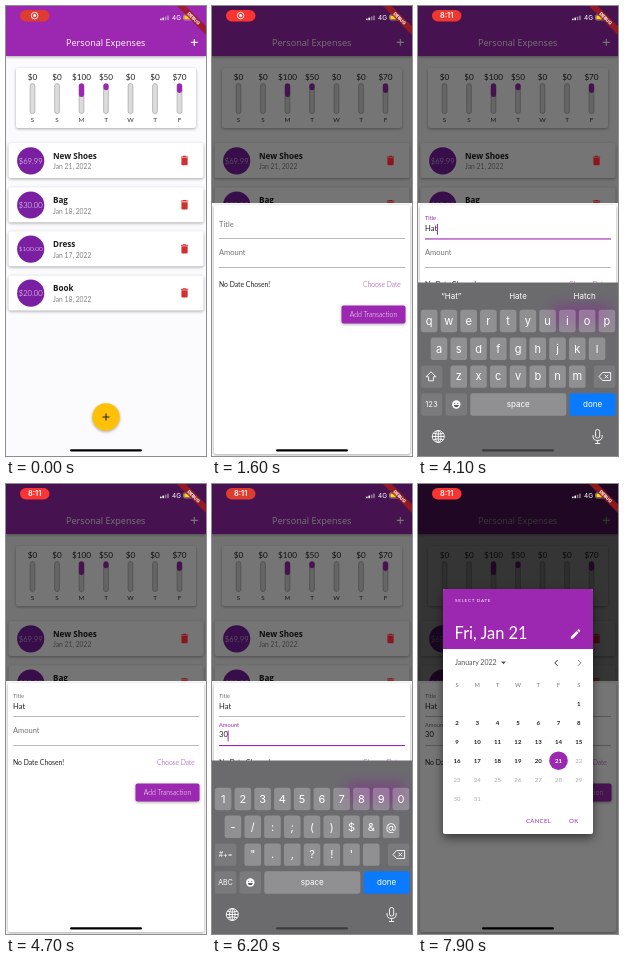
Animation, 200 px wide and 450 px high, one loop 8 s. Source, as an HTML page:

```html
<!DOCTYPE html>
<html lang="en">
<head>
<meta charset="utf-8">
<title>Expense tracker</title>
<style>
  html, body { margin: 0; width: 100%; height: 100%; overflow: hidden; background: #fbfafc; }
  svg { display: block; width: 100vw; height: 100vh; }
  text { font-family: Lato, "Open Sans", sans-serif; white-space: pre; }
  .open { font-family: "Open Sans", sans-serif; }
  .ui { font-family: Inter, Roboto, sans-serif; }
  .light { font-weight: 300; }
  .card { fill: #fff; filter: drop-shadow(0 1.8px 1.6px rgba(0, 0, 0, .33)); }
</style>
</head>
<body>
<svg id="stage" viewBox="0 0 200 450" preserveAspectRatio="none"></svg>
<script>
const LOOP = 8000;
const PURPLE = '#9c27b0', DEEP = '#7b1fa2', GREY = '#757575', INK = '#222';

// Times in ms at which things start to happen
const T = {
  sheet: 1200, clock: 1900, focusTitle: 1900, keysReady: 2400, shift: 2700,
  typeH: 2900, typeA: 3300, typeT: 3750, done: 4350, focusAmount: 4750,
  numbers: 5600, type3: 5900, type0: 6150, leave: 6760, dialog: 7450
};
const KEYS_TOP = 276.5, KEYS_HEIGHT = 173.5;

const clamp = x => Math.max(0, Math.min(1, x));
const mix = (a, b, k) => a + (b - a) * k;
const easeOut = x => 1 - (1 - clamp(x)) ** 2;
const ramp = (t, start, length) => easeOut((t - start) / length);

const rect = (x, y, w, h, fill, r = 0, extra = '') =>
  `<rect x="${x}" y="${y}" width="${w}" height="${h}" rx="${r}" fill="${fill}" ${extra}/>`;
const circle = (x, y, r, fill, extra = '') =>
  `<circle cx="${x}" cy="${y}" r="${r}" fill="${fill}" ${extra}/>`;
const text = (s, x, y, size, fill, extra = '') =>
  `<text x="${x}" y="${y}" font-size="${size}" fill="${fill}" ${extra}>${s}</text>`;
const mid = (s, x, y, size, fill, extra = '') =>
  text(s, x, y, size, fill, 'text-anchor="middle" ' + extra);
const stroke = (d, color, width, extra = '') =>
  `<path d="${d}" fill="none" stroke="${color}" stroke-width="${width}" ${extra}/>`;
const plus = (x, y, r, color, width) =>
  stroke(`M${x - r} ${y}h${2 * r}M${x} ${y - r}v${2 * r}`, color, width);
const group = (id, body) => `<g id="${id}">${body}</g>`;

const ROW_Y = [154.5, 198.7, 242.8, 286.9];

function header() {
  return `<rect class="card" width="200" height="50" style="fill:${PURPLE}"/>` +
    mid('Personal Expenses', 99.7, 39.7, 9.1, '#fff', 'class="open"') +
    plus(188.3, 36.4, 3.5, '#fff', 1.1);
}

function chart() {
  const spent = [0, 0, 100, 50, 0, 0, 70];
  const bars = spent.map((amount, i) => {
    const x = 26.5 + 24.5 * i;
    const h = 30 * amount / 220;
    return mid('$' + amount, x, 74, 8.2, INK) +
      rect(x - 2.4, 77.6, 4.8, 30, '#dcdcdc', 2.4, 'stroke="#999" stroke-width=".6"') +
      (h ? rect(x - 2.6, 77.4, 5.2, h, PURPLE, 2.4) : '') +
      mid('SSMTWTF'[i], x, 116, 6.3, '#333');
  });
  return '<rect class="card" x="10" y="62" width="180" height="60" rx="2"/>' + bars.join('');
}

function rows() {
  const items = [
    ['$69.99', 'New Shoes', 'Jan 21, 2022'], ['$30.00', 'Bag', 'Jan 18, 2022'],
    ['$100.00', 'Dress', 'Jan 17, 2022'], ['$20.00', 'Book', 'Jan 18, 2022']
  ];
  return items.map(([price, name, date], i) => {
    const y = ROW_Y[i], size = price.length > 6 ? 6.5 : 7.6;
    return `<rect class="card" x="2.5" y="${y - 17.5}" width="195" height="35" rx="2"/>` +
      circle(24.7, y + .3, 13.6, DEEP) +
      mid(price, 24.7, y + size * .36 + .3, size, '#fff', 'class="light"') +
      text(name, 47, y - 2, 8.1, '#1c1c1c', 'class="open" font-weight="700"') +
      text(date, 47, y + 8.8, 6.75, '#858585');
  }).join('');
}

function trash(y) {
  return `<path transform="translate(172.3 ${y - 6.2}) scale(.52)"
    d="M6 19q0 2 2 2h8q2 0 2-2V7H6zM19 4h-3.5l-1-1h-5l-1 1H5v2h14z"/>`;
}

function fab() {
  return circle(100, 411, 13.7, '#ffc107',
    'style="filter:drop-shadow(0 1.5px 1.5px rgba(0,0,0,.35))"') +
    plus(100, 411, 3.5, '#222', 1.1);
}

function field(id, label, y) {
  return text(label, 7, y, 7.5, GREY, `id="${id}Label"`) +
    text('', 7, y + 4, 7.6, INK, `id="${id}Value"`) +
    rect(7, y + 11.8, 186, .6, '#8a8a8a', 0, `id="${id}Line"`) +
    rect(7, y - 2.6, 1, 10.8, PURPLE, 0, `id="${id}Cursor"`);
}

function sheet() {
  return rect(0, 197, 200, 253, '#fafafa') +
    '<rect class="card" x="2" y="199" width="196" height="249" rx="2"/>' +
    field('title', 'Title', 220.6) + field('amount', 'Amount', 249.2) +
    text('No Date Chosen!', 7, 281.2, 6.8, INK) +
    text('Choose Date', 151, 281.2, 6.7, PURPLE, 'class="light"') +
    `<rect class="card" x="129.5" y="299.5" width="64" height="18" rx="2" style="fill:${PURPLE}"/>` +
    mid('Add Transaction', 161.5, 311, 6.9, '#fff', 'class="light"');
}

function keyboard() {
  const key = (x, y, w, alpha = .25) =>
    rect(x, y - 11.2, w, 22.4, '#fff', 2.6, `fill-opacity="${alpha}"`);
  let out = rect(0, KEYS_TOP, 200, KEYS_HEIGHT, '#6b6b6e') +
    rect(134, 299, 60, 20, '#8a0f9c', 5, 'id="glow" style="filter:blur(7px)"');
  for (let i = 0; i < 3; i++) out += mid('', 33.3 + 66.7 * i, 292.6, 8, '#fff', 'class="ui hint"');

  [10, 9, 7].forEach((count, row) => {
    const y = 315 + 27.8 * row;
    for (let i = 0; i < count; i++) {
      const x = 100 + (i - (count - 1) / 2) * 19.75;
      out += key(x - 8.3, y, 16.6) + mid('', x, y + 3.8, 11, '#fff', 'class="ui letter"');
    }
  });

  const y3 = 370.6, y4 = 398.5;
  out += key(2.8, y3, 21.5, .1) + key(175.8, y3, 21.5, .1) +
    stroke('M13 365.8l-5 5h2.6v4h4.8v-4h2.6z', '#fff', .9, 'id="shiftIcon" stroke-linejoin="round"') +
    mid('#+=', 13.5, y3 + 2.6, 7, '#fff', 'id="symbols" class="ui"') +
    stroke('M181 370.5l3.6-4h8v8h-8zM186.6 368.7l3.6 3.6m0-3.6l-3.6 3.6', '#fff', .9, 'stroke-linejoin="round"') +
    key(2.8, y4, 21.5, .1) + mid('123', 13.5, y4 + 2.8, 7.6, '#fff', 'id="modeKey" class="ui"') +
    key(27.5, y4, 21.5, .1) + circle(38.3, y4, 4.2, '#fff') +
    circle(36.8, y4 - 1.2, .6, '#555') + circle(39.8, y4 - 1.2, .6, '#555') +
    `<path d="M35.8 ${y4 + .6}h5q-.6 2.2-2.5 2.2t-2.5-2.2z" fill="#555"/>` +
    key(52.3, y4, 96) + mid('space', 100.3, y4 + 2.6, 8, '#fff', 'class="ui"') +
    rect(151.5, y4 - 11.2, 46.2, 22.4, '#0a7bff', 2.6) +
    mid('done', 174.6, y4 + 2.6, 8, '#fff', 'id="doneText" class="ui"');

  const globe = circle(20.3, 430.5, 6, 'none') + '<ellipse cx="20.3" cy="430.5" rx="2.8" ry="6"/>' +
    '<path d="M14.3 430.5h12M20.3 424.5v12M15.4 427.3q4.9 1.8 9.8 0M15.4 433.7q4.9-1.8 9.8 0"/>';
  const mic = rect(177.5, 423.5, 4.2, 8.6, 'none', 2.1) +
    '<path d="M175 429v1q0 4.5 4.6 4.5t4.6-4.5v-1M179.6 434.5v3m-2.6 0h5.2"/>';
  return out + `<g fill="none" stroke="#fff" stroke-width=".9">${globe}${mic}</g>`;
}

function dialog() {
  let out = `<rect class="card" x="25" y="105" width="150" height="245" rx="2"
      style="filter:drop-shadow(0 4px 5px rgba(0,0,0,.5))"/>` +
    `<path d="M25 165V107q0-2 2-2h146q2 0 2 2v58z" fill="${PURPLE}"/>` +
    text('SELECT DATE', 37, 118, 4.6, '#fff', 'letter-spacing=".7"') +
    text('Fri, Jan 21', 36.6, 155.3, 16.4, '#fff') +
    '<path transform="translate(151.2 143.6) scale(.53)" fill="#fff" d="M3 17.2V21h3.8L17.8 9.9 14.1 6.2zM20.7 7q.6-.7 0-1.4l-2.3-2.3q-.7-.6-1.4 0l-1.8 1.8 3.7 3.7z"/>' +
    text('January 2022', 37, 181.2, 7, '#555') +
    '<path d="M83 177.6h5l-2.5 2.6z" fill="#555"/>' +
    stroke('M139.6 176l-2.8 2.9 2.8 2.9', '#333', 1) +
    stroke('M160 176l2.8 2.9-2.8 2.9', '#888', 1);
  const column = i => 39 + 20.3 * i;
  [...'SMTWTFS'].forEach((d, i) => out += mid(d, column(i), 203.2, 5.8, '#777'));
  for (let day = 1; day <= 31; day++) {
    const cell = day + 5, x = column(cell % 7), y = 220 + 18.9 * Math.floor(cell / 7);
    const today = day === 21;
    if (today) out += circle(x, y, 9.3, PURPLE);
    out += mid(day, x, y + 2.2, 6.1, today ? '#fff' : day > 21 ? '#aaa' : INK,
      day > 21 ? '' : 'font-weight="700"');
  }
  return out + text('CANCEL', 108, 339.4, 6.1, PURPLE, 'letter-spacing=".25"') +
    text('OK', 151, 339.4, 6.1, PURPLE, 'letter-spacing=".25"');
}

function status() {
  const bars = [0, 1, 2, 3].map(i =>
    rect(154 + 2.4 * i, 12.6 - i, 1.6, 1.6 + i, '#fff', .4, `opacity="${i < 2 ? 1 : .45}"`)).join('');
  return rect(14, 4, 29.5, 11.4, '#f8352c', 5.7, 'id="pill"') +
    group('record', circle(28.6, 9.6, 3.3, 'none', 'stroke="#fff" stroke-width=".9"') + circle(28.6, 9.6, 1.5, '#fff')) +
    mid('8:11', 28.7, 12.4, 7.4, '#fff', 'id="clock" class="ui" font-weight="600"') +
    bars + text('4G', 166, 14.2, 6.4, '#fff', 'class="ui"') +
    rect(177.5, 8.8, 10, 5.2, 'none', 1.5, 'stroke="#ddd" stroke-width=".5"') +
    rect(178.3, 9.6, 6, 3.6, '#ffd60a', .8) +
    '<g transform="translate(200 0) rotate(45)">' +
    rect(-21, 14.4, 42, 6.15, '#a01c1c', 0, 'fill-opacity=".85"') +
    mid('DEBUG', 0, 19.1, 4.5, '#fff', 'class="ui" font-weight="800"') + '</g>' +
    rect(64, 443.3, 72, 2.3, '#000', 1.15, 'id="homeBar"');
}

const stage = document.getElementById('stage');
stage.innerHTML = rect(0, 0, 200, 450, '#fbfafc') + header() + chart() + rows() + fab() +
  rect(0, 0, 200, 450, '#000', 0, 'id="scrim"') +
  group('bins', ROW_Y.map(trash).join('')) +
  group('sheet', sheet()) + group('keyboard', keyboard()) +
  rect(0, 0, 200, 450, '#000', 0, 'id="dialogScrim"') +
  group('dialog', dialog()) + status();

const $ = id => document.getElementById(id);
const set = (id, attrs) => {
  for (const name in attrs) $(id).setAttribute(name, attrs[name]);
};
const write = (node, s) => { if (node.textContent !== s) node.textContent = s; };
const letters = [...document.querySelectorAll('.letter')];
const hints = [...document.querySelectorAll('.hint')];

function updateField(id, y, value, float, focused, t, since) {
  set(id + 'Label', {
    y: mix(y, y - 6.4, float),
    'font-size': mix(7.5, 5.7, float),
    fill: focused ? PURPLE : GREY
  });
  write($(id + 'Value'), value);
  set(id + 'Line', { height: focused ? 1.1 : .6, fill: focused ? PURPLE : '#8a8a8a' });
  const textWidth = value ? $(id + 'Value').getComputedTextLength() : 0;
  const lit = focused && (t - since) % 1000 < 500;
  set(id + 'Cursor', { x: 6.8 + textWidth, opacity: lit ? 1 : 0 });
}

function suggestions(t, title) {
  if (t >= T.numbers) return ['', '', ''];
  if (t >= T.focusAmount) return ['king', 'python', 'okay'];
  if (title === 'Hat') return ['“Hat”', 'Hate', 'Hatch'];
  return [title && `“${title}”`, '', ''];
}

function draw(t) {
  const open = ramp(t, T.sheet, 300);
  set('scrim', { opacity: .54 * open });
  set('bins', { fill: `rgb(${mix(211, 140, open)},${mix(47, 22, open)},${mix(47, 32, open)})` });
  set('sheet', { transform: `translate(0 ${253 * (1 - open)})` });

  const passed = times => times.filter(x => t >= x);
  const title = 'Hat'.slice(0, passed([T.typeH, T.typeA, T.typeT]).length);
  const amount = '30'.slice(0, passed([T.type3, T.type0]).length);
  const lastInput = Math.max(0, ...passed(
    [T.focusTitle, T.typeH, T.typeA, T.typeT, T.focusAmount, T.type3, T.type0]));
  updateField('title', 220.6, title, ramp(t, T.focusTitle, 200),
    t >= T.focusTitle && t < T.done, t, lastInput);
  updateField('amount', 249.2, amount, ramp(t, T.focusAmount, 200),
    t >= T.focusAmount && t < T.leave, t, lastInput);

  const up = ramp(t, T.focusTitle, 350) - ramp(t, T.done, 350) +
    ramp(t, T.focusAmount, 380) - ramp(t, T.leave, 400);
  set('keyboard', { transform: `translate(0 ${KEYS_HEIGHT * (1 - up)})` });
  set('glow', { opacity: .4 * up ** 2 });
  set('homeBar', { fill: up > .05 ? '#3c3c3e' : '#000' });

  const numeric = t >= T.numbers;
  let layout = numeric ? '1234567890-/:;()$&@".,?!\'' : 'qwertyuiopasdfghjklzxcvbnm';
  if (t >= T.shift && t < T.typeH) layout = layout.toUpperCase();
  letters.forEach((node, i) => write(node, layout[i] || ''));
  suggestions(t, title).forEach((s, i) => write(hints[i], s));
  write($('modeKey'), numeric ? 'ABC' : '123');
  set('modeKey', { 'font-size': numeric ? 7 : 7.6 });
  set('symbols', { opacity: +numeric });
  set('shiftIcon', { opacity: +!numeric });
  set('doneText', { fill: t < T.keysReady ? '#0a3f8a' : '#fff' });

  const shown = ramp(t, T.dialog, 250);
  set('dialogScrim', { opacity: .54 * shown });
  set('dialog', { opacity: shown });

  // The recording pill breathes slowly
  const pulse = (1 - Math.cos(2 * Math.PI * t / 3200)) / 2;
  set('pill', { fill: `rgb(${mix(222, 250, pulse)},${mix(60, 52, pulse)},48)` });
  const clock = t >= T.clock;
  set('clock', { opacity: +clock });
  set('record', { opacity: +!clock });
}

const start = performance.now();
function frame(now) {
  draw(Math.max(0, now - start) % LOOP);
  requestAnimationFrame(frame);
}
draw(0);
requestAnimationFrame(frame);
</script>
</body>
</html>
```
